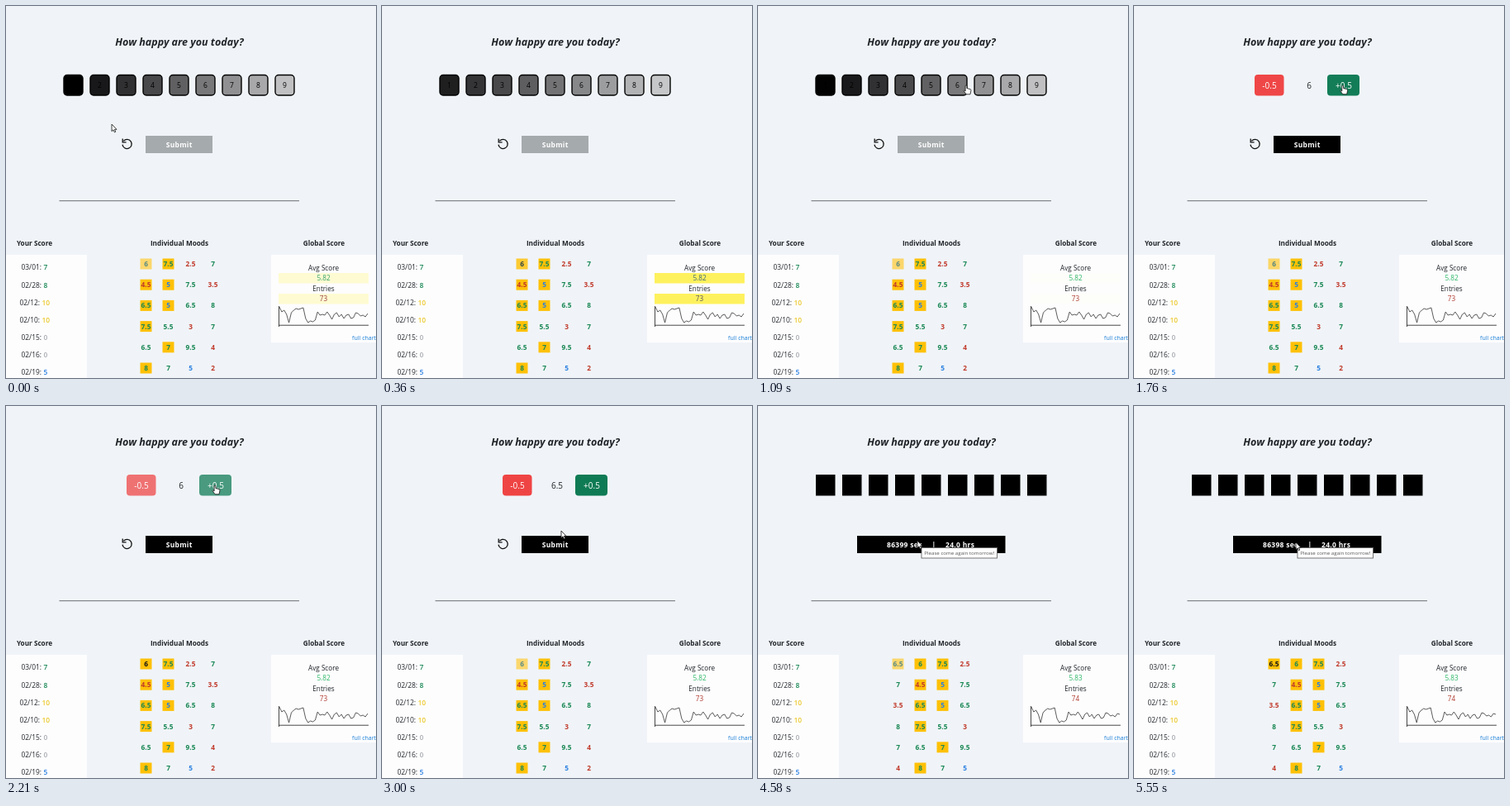
An HTML page that plays this animation: 448x450 px, repeating every 5.58 s.

```html
<!DOCTYPE html>
<html lang="en">
<head>
<meta charset="utf-8">
<title>Mood tracker</title>
<style>
  html, body { margin: 0; width: 100%; height: 100%; overflow: hidden; background: #f0f4f8; }
  svg { display: block; width: 448px; height: 450px; font-family: "Open Sans", "Noto Sans", sans-serif; }
  text { white-space: pre; }
</style>
</head>
<body>
<svg id="stage" viewBox="0 0 448 450" xmlns="http://www.w3.org/2000/svg"></svg>
<script>
const LOOP = 5580;
const PICK = 1400, PLUS = 2350, SUBMIT = 3620, UPDATE = 4090, TICK = 5090, TOOLTIP = 4320;
const BG = [240, 244, 248], GOLD = [255, 193, 7], BLACK = [0, 0, 0], WHITE = [255, 255, 255];
const GREEN = "#198754", RED = "#c0392b", BLUE = "#2a7fe0", YELLOW = "#ecc727", INK = "#212529";
const stage = document.getElementById("stage");

function add(tag, attrs, parent = stage) {
  const node = document.createElementNS("http://www.w3.org/2000/svg", tag);
  set(node, attrs);
  parent.appendChild(node);
  return node;
}
function set(node, attrs) {
  for (const key in attrs) node.setAttribute(key, attrs[key]);
}
function group(parent = stage) {
  return add("g", {}, parent);
}
function rect(x, y, width, height, fill, parent, extra = {}) {
  return add("rect", { x, y, width, height, fill, ...extra }, parent);
}
function label(str, x, y, size, parent, extra = {}) {
  const node = add("text", { x, y, "font-size": size, fill: INK, "text-anchor": "middle", ...extra }, parent);
  node.textContent = str;
  return node;
}
function show(node, on) {
  node.style.display = on ? "" : "none";
}
function write(node, str) {
  if (node.textContent !== str) node.textContent = str;
}
function mix(a, b, k) {
  return `rgb(${a.map((v, i) => Math.round(v + (b[i] - v) * k)).join()})`;
}
const bold = { "font-weight": 700 };
const start = { "text-anchor": "start" };

// Question and divider
rect(0, 0, 448, 450, mix(BG, BG, 0));
label("How happy are you today?", 210, 48, 12.5, stage, { ...bold, "font-style": "italic" });
add("path", { d: "M64.5 235.7H355", stroke: "#5c6064", "stroke-width": 0.9 });

// Rating choices
const choices = group();
const choiceBoxes = [];
for (let i = 0; i < 9; i++) {
  const x = 70 + 32 * i;
  choiceBoxes.push(rect(x, 83.5, 23, 24.5, "#000", choices, { rx: 4, stroke: "#000", "stroke-width": 1.4 }));
  label(i + 1, x + 11.5, 99, 8.5, choices, { fill: "#000" });
}

// Fine adjustment
const adjust = group();
const minus = rect(146, 83, 35.5, 25.5, "", adjust, { rx: 4 });
const plus = rect(234, 83, 39, 25.5, "", adjust, { rx: 4 });
label("-0.5", 164, 99.8, 10, adjust, { fill: "#fff" });
label("+0.5", 254, 99.8, 10, adjust, { fill: "#fff" });
const picked = label("6", 212, 99.5, 10, adjust);

// Reset and submit
const actions = group();
add("path", { d: "M142.4 163.2A5.6 5.6 0 1 1 141 167.6", fill: "none", stroke: "#111", "stroke-width": 1.3 }, actions);
add("path", { d: "M141.2 160.4V164.8H145.6", fill: "none", stroke: "#111", "stroke-width": 1.3 }, actions);
const submit = rect(169, 157, 81, 21, "", actions);
const caption = { ...bold, fill: "#fff", "letter-spacing": 0.3 };
label("Submit", 209.7, 171, 8.5, actions, caption);

// Locked state
const locked = group();
for (let i = 0; i < 9; i++) rect(70 + 32 * i, 83, 23.5, 25.5, "#000", locked);
rect(120, 157, 179.5, 21, "#000", locked);
const seconds = label("", 156, 171, 8.5, locked, { ...caption, ...start });
label("|", 213, 171, 8.5, locked, caption);
label("24.0 hrs", 227, 171, 8.5, locked, { ...caption, ...start });

// Personal scores
label("Your Score", 34.5, 290, 8.2, stage, bold);
rect(0, 301, 98, 149, "#fdfdfe");
const scores = [
  ["03/01:", 7, GREEN], ["02/28:", 8, GREEN], ["02/12:", 10, YELLOW], ["02/10:", 10, YELLOW],
  ["02/15:", 0, "#a9adb2"], ["02/16:", 0, "#a9adb2"], ["02/19:", 5, BLUE]
];
scores.forEach(([date, score, fill], i) => {
  const y = 319.4 + 21.1 * i;
  const x = score === 10 ? 41 : 43;
  label(date, x, y, 8.4, stage, { "text-anchor": "end" });
  label(score, x + 2.5, y, 8.4, stage, { ...start, "font-weight": 600, fill });
});

// Everyone's moods, newest first
label("Individual Moods", 210, 290, 8.2, stage, bold);
const moods = [6.5, 6, 7.5, 2.5, 7, 4.5, 5, 7.5, 3.5, 6.5, 5, 6.5, 8, 7.5, 5.5, 3, 7, 6.5, 7, 9.5, 4, 8, 7, 5, 2];
const marked = new Set([0, 1, 2, 5, 6, 9, 10, 13, 18, 21]);
const cells = Array.from({ length: 24 }, (_, i) => {
  const x = 169.5 + 27 * (i % 4), y = 312 + 25.2 * Math.floor(i / 4);
  return { box: rect(x - 7, y - 6.5, 14, 13, ""), text: label("", x, y + 3, 8.3, stage, bold) };
});
function moodColor(v) {
  return v > 5 ? GREEN : v === 5 ? BLUE : RED;
}

// Global summary
label("Global Score", 385, 290, 8.2, stage, bold);
rect(321, 301, 127, 106, "#fdfdfe");
label("Avg Score", 384.5, 319.7, 8.2);
label("Entries", 384.5, 345, 8.2);
const flashes = [323, 348].map(y => rect(330, y, 109, 12.5, "#ffeb00"));
const average = label("", 384.5, 332, 8.2);
const entries = label("", 384.5, 357.3, 8.2);
add("path", { d: "M330.5 363V388M330 386.2H439", stroke: "#333", "stroke-width": 0.9, fill: "none" });
const chartY = [364, 370, 368, 373, 383, 371, 368, 366, 367, 366, 365, 378, 383, 381, 382, 380, 370, 374, 373,
  374, 370, 374, 379, 373, 371, 376, 373, 378, 374, 373, 378, 377, 371, 372, 375, 374, 376, 372, 373];
const chart = add("polyline", { fill: "none", stroke: "#333", "stroke-width": 0.8, "stroke-linejoin": "round" });
label("full chart", 448, 404.2, 7, stage, { "text-anchor": "end", fill: "#1b7fd6" });

// Tooltip and pointer
const tooltip = group();
rect(198, 171.5, 91.5, 12.5, "#fff", tooltip, { stroke: "#666", "stroke-width": 0.9 });
label("Please come again tomorrow!", 243.7, 180, 6.15, tooltip, { fill: "#555" });
const pointer = group();
const arrow = add("path", {
  d: "M0 0V8.6L2 6.8L3.4 9.8L4.8 9.1L3.4 6.3H6Z", fill: "#fff", stroke: "#111", "stroke-width": 0.8
}, pointer);
const hand = add("path", {
  d: "M-.9 5V.5Q0-.7 .9 .5V3.6L5 4.6Q6.1 5 5.9 6.4L5 10.8H.2L-3 6.7Q-2.8 5.3-.9 7Z",
  fill: "#fff", stroke: "#111", "stroke-width": 0.8, "stroke-linejoin": "round"
}, pointer);

// Pointer keys: time, x, y
const route = [
  [0, 128, 143], [750, 205, 128], [1050, 252, 96], [1450, 252, 96], [1950, 253, 96],
  [2450, 253, 96], [3000, 217, 151], [3300, 208, 165], [3800, 205, 166], [4300, 193, 163],
  [4800, 193, 163], [5300, 196, 165], [LOOP, 196, 165]
];
function pointerAt(t) {
  const i = Math.max(1, route.findIndex(key => key[0] >= t));
  const [t0, x0, y0] = route[i - 1], [t1, x1, y1] = route[i];
  const k = (t - t0) / (t1 - t0), e = k * k * (3 - 2 * k);
  return [x0 + (x1 - x0) * e, y0 + (y1 - y0) * e];
}

function drawMoods(t, glow) {
  const first = t < UPDATE ? 1 : 0;
  cells.forEach(({ box, text }, i) => {
    const value = moods[i + first], on = marked.has(i + first), fade = i ? 0 : 1 - glow;
    show(box, on);
    set(box, { fill: mix(GOLD, [251, 215, 110], fade) });
    set(text, { fill: i ? moodColor(value) : mix([20, 20, 20], [91, 140, 133], fade) });
    write(text, String(value));
  });
}

function drawSummary(t) {
  const peak = 500, width = t < peak ? 420 : 300;
  const flash = Math.exp(-(((t - peak) / width) ** 2));
  const updated = t >= UPDATE;
  flashes.forEach(node => set(node, { opacity: 0.7 * flash }));
  set(average, { fill: mix([45, 184, 102], [60, 95, 125], flash) });
  set(entries, { fill: mix([176, 58, 46], [80, 85, 100], flash) });
  write(average, updated ? "5.83" : "5.82");
  write(entries, updated ? "74" : "73");
  const count = chartY.length - (updated ? 0 : 1);
  set(chart, { points: chartY.slice(0, count).map((y, i) => `${331 + 107 * i / (count - 1)},${y}`).join(" ") });
}

function draw(t) {
  const glow = ((1 + Math.cos(2 * Math.PI * (t - 580) / 1650)) / 2) ** 3;
  const done = t >= SUBMIT, chosen = t >= PICK;
  show(choices, !chosen);
  show(adjust, chosen && !done);
  show(actions, !done);
  show(locked, done);
  choiceBoxes.forEach((box, i) => {
    const shade = 24 * i;
    set(box, { fill: mix([shade, shade, shade + (i ? 2 : 0)], BG, 0.22 * glow) });
  });
  set(minus, { fill: mix([239, 68, 68], BG, 0.26 * glow) });
  set(plus, { fill: mix([15, 123, 85], BG, 0.26 * glow) });
  set(submit, { fill: chosen ? "#000" : "#a5aaac" });
  write(picked, t < PLUS ? "6" : "6.5");
  write(seconds, `${t < UPDATE ? 86400 : t < TICK ? 86399 : 86398} sec`);
  drawMoods(t, glow);
  drawSummary(t);

  const [x, y] = pointerAt(t);
  const onButton = (y < 109 && x > 230) || (t > 3150 && !done);
  set(pointer, { transform: `translate(${x} ${y})` });
  show(pointer, t < 300 || t > 750);
  show(arrow, !onButton);
  show(hand, onButton);
  show(tooltip, t >= TOOLTIP);
}

const began = performance.now();
function frame() {
  draw((performance.now() - began) % LOOP);
  requestAnimationFrame(frame);
}
draw(0);
requestAnimationFrame(frame);
</script>
</body>
</html>
```
